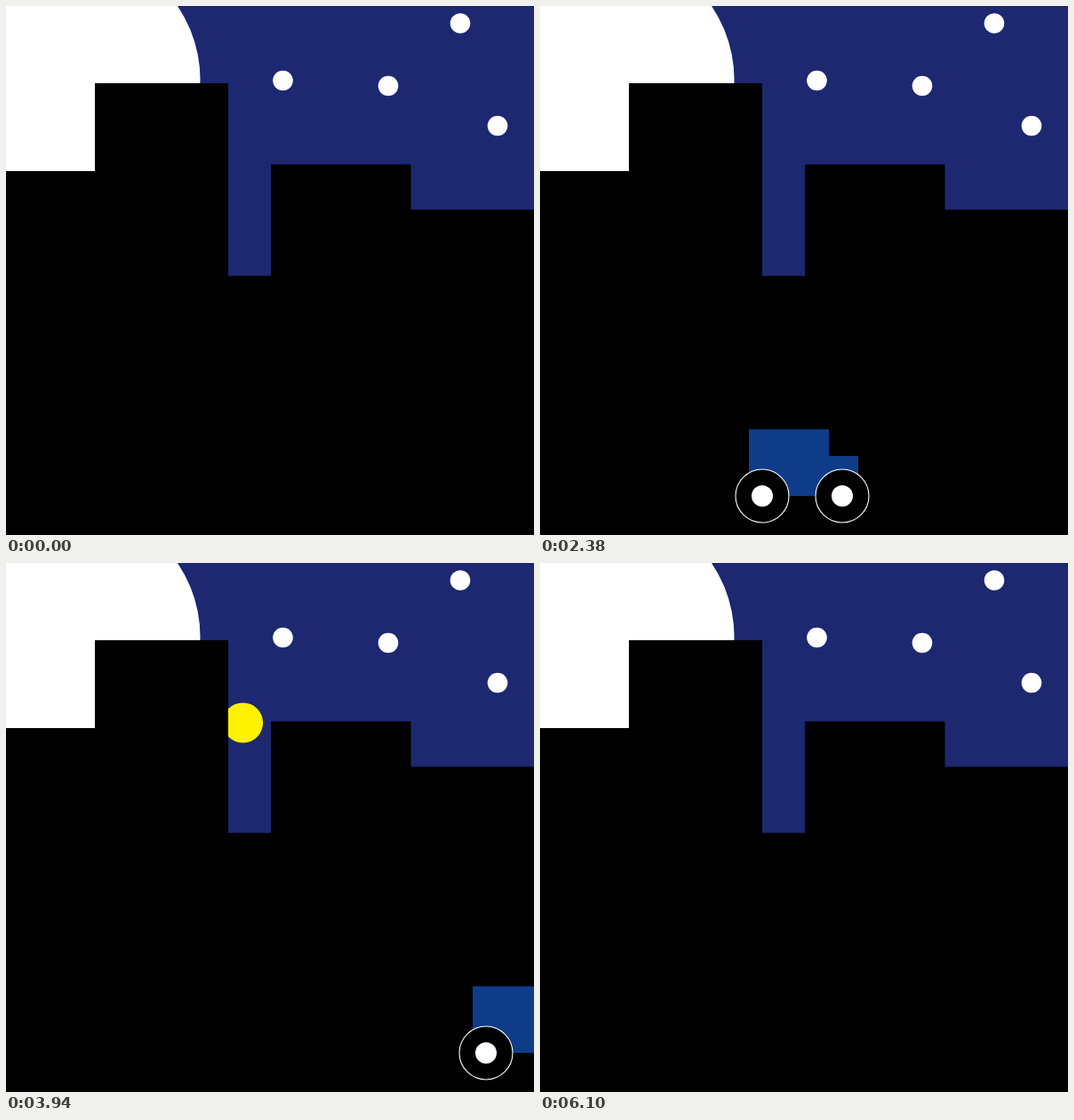
An HTML page for the animation above (7890 ms loop, 594 px wide and 596 px high).

```html
<!DOCTYPE html>
<html lang="en">
<head>
<meta charset="utf-8">
<title>Night city</title>
<style>
  html, body { margin: 0; width: 100%; height: 100%; overflow: hidden; background: #000; }
  svg { display: block; width: 100%; height: 100%; }
  .tire { fill: #000; stroke: #fff; stroke-width: 1.1; }
</style>
</head>
<body>
<svg viewBox="0 0 594 596">
  <rect width="594" height="596" fill="#1d2871"/>
  <circle cx="70.7" cy="83" r="147.8" fill="#fff"/>
  <g fill="#fff">
    <circle cx="311.5" cy="84" r="11.3"/>
    <circle cx="430" cy="90" r="11.3"/>
    <circle cx="511" cy="19.5" r="11.3"/>
    <circle cx="553" cy="135" r="11.3"/>
  </g>
  <circle id="ball" r="22.6" fill="#fff200"/>
  <path d="M0 186H100V87H250V304H298V178.5H455.5V229.5H594V596H0Z"/>
  <g id="car">
    <path d="M0 477H90V507H123V552H0Z" fill="#0f3c89"/>
    <circle class="tire" cx="15" cy="552" r="30"/>
    <circle class="tire" cx="105" cy="552" r="30"/>
    <circle cx="15" cy="552" r="12" fill="#fff"/>
    <circle cx="105" cy="552" r="12" fill="#fff"/>
  </g>
</svg>
<script>
const LOOP = 7890, STEP = 77;
// Each run of steps: start time in ms and number of steps.
const RUNS = [[1130, 11], [1990, 11], [2840, 11], [3700, 10], [4490, 11], [5330, 10]];
const END = 6100;
const car = document.getElementById('car');
const ball = document.getElementById('ball');

function stepAt(time) {
  let step = -1;
  for (const [start, count] of RUNS) {
    if (time < start) break;
    step += Math.min(count, Math.floor((time - start) / STEP) + 1);
  }
  return step;
}

function place(element, x, y) {
  element.setAttribute('transform', `translate(${x} ${y})`);
}

function draw() {
  const time = performance.now() % LOOP;
  const step = stepAt(time);
  const visibility = step >= 0 && time < END ? 'visible' : 'hidden';
  car.style.visibility = ball.style.visibility = visibility;
  place(car, Math.floor(4 + 14.49 * step), 0);
  // The ball rises diagonally from behind the tall building.
  const rise = 7.2 * (step - 46);
  place(ball, 338.5 + rise, 108 - rise);
  requestAnimationFrame(draw);
}
draw();
</script>
</body>
</html>
```
